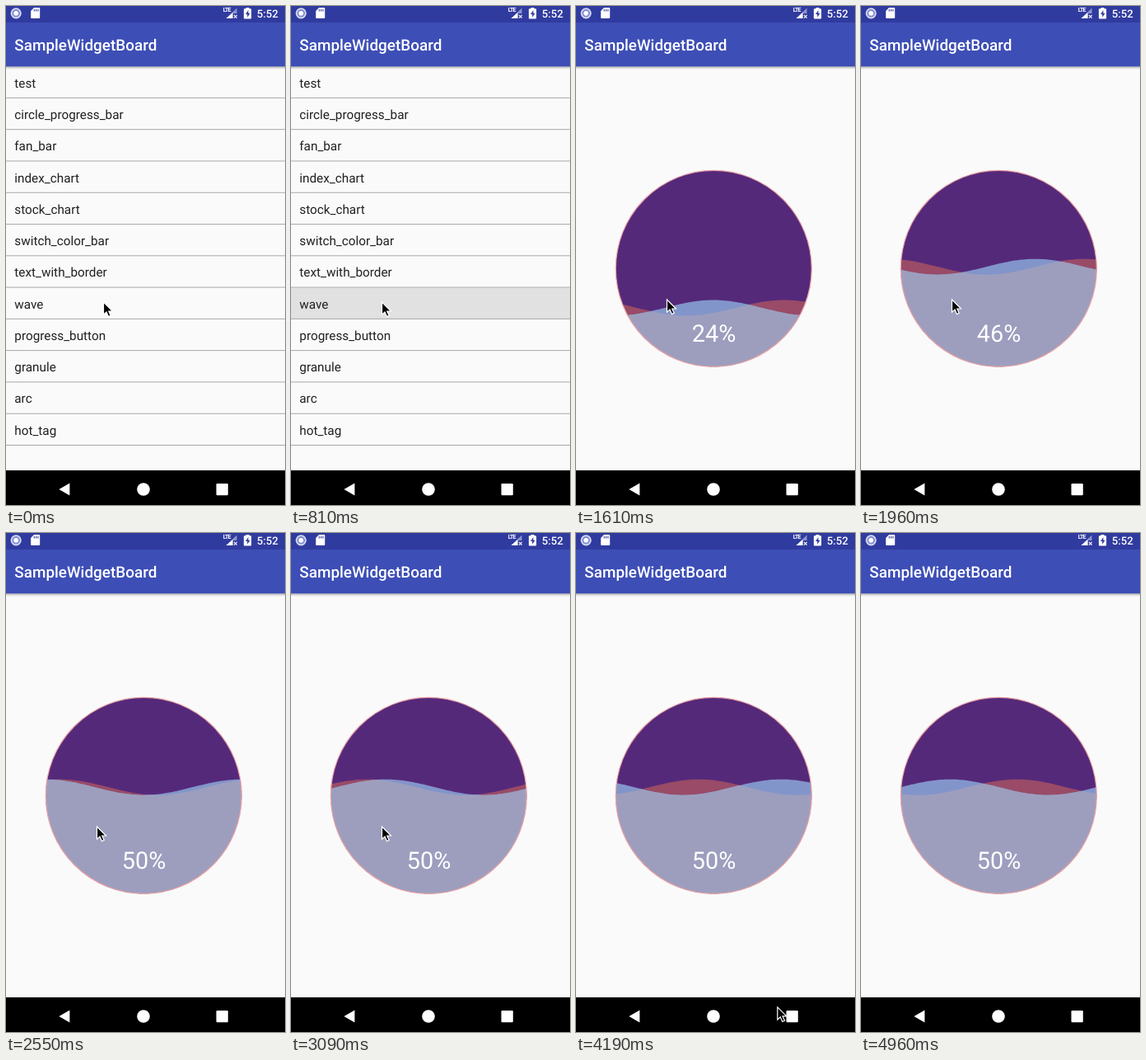
Animation, 339 px wide and 605 px high, one loop 5030 ms. Source, as an HTML page:

```html
<!DOCTYPE html>
<html lang="en">
<head>
<meta charset="utf-8">
<title>Wave progress</title>
<style>
  html, body { margin: 0; width: 100%; height: 100%; overflow: hidden; background: #000; }
  svg { display: block; width: 339px; height: 605px; font-family: Roboto, sans-serif; text-rendering: geometricPrecision; }
</style>
</head>
<body>
<svg viewBox="0 0 339 605">
  <defs>
    <linearGradient id="shade" x2="0" y2="1">
      <stop offset="0" stop-color="#000" stop-opacity=".3"/>
      <stop offset="1" stop-color="#000" stop-opacity="0"/>
    </linearGradient>
    <clipPath id="disc"><circle cx="167.3" cy="318.4" r="119"/></clipPath>
    <g id="chrome">
      <rect width="339" height="563" fill="#fafafa"/>
      <rect y="73" width="339" height="4" fill="url(#shade)"/>
      <rect width="339" height="73.3" fill="#3d4eb6"/>
      <rect width="339" height="20" fill="#303b9f"/>
      <text x="10.3" y="54" font-size="18.9" font-weight="500" fill="#fff">SampleWidgetBoard</text>
    </g>
  </defs>

  <rect width="339" height="605"/>
  <use href="#chrome"/>
  <rect id="press" y="341.5" width="339" height="37.5" opacity=".1"/>
  <g id="list" font-size="15.3" fill="#212121"></g>

  <g id="page">
    <use href="#chrome"/>
    <g clip-path="url(#disc)">
      <rect x="47" y="198" width="241" height="241" fill="#55297a"/>
      <path id="red" fill="#994b67"/>
      <path id="blue" fill="#8295ca"/>
      <path id="both" fill="#9d9ebe"/>
    </g>
    <circle cx="167.3" cy="318.4" r="119" fill="none" stroke="#eba3a6" stroke-width="1.2"/>
    <text id="percent" x="167.5" y="406.5" font-size="28.8" text-anchor="middle" fill="#fff"></text>
  </g>

  <!-- status bar -->
  <g fill="#fff">
    <circle cx="12.2" cy="8.8" r="5.7" fill="#7f8bd0" stroke="#d5d9f0" stroke-width="1.8"/>
    <circle cx="12.2" cy="8.8" r="2.9"/>
    <path d="M34 2h6.2q1 0 1 1v11q0 1-1 1h-9q-1 0-1-1V6z"/>
    <path d="M34.3 4v2.6M36.6 4v2.6M38.9 4v2.6" stroke="#303b9f" stroke-width="1.1"/>
    <text x="263.8" y="7.4" font-size="7.2" font-weight="700" letter-spacing="-.9">LTE</text>
    <path d="M280.5 2.5V9h-5v6h-8z" fill="#8d94cb"/>
    <path d="M275.5 8v7h-8z"/>
    <path d="M277 11l3.6 3.6M280.6 11l-3.6 3.6" stroke="#fff" stroke-width="1.1"/>
    <path d="M291.5 3.3V2h4v1.3h1.8q.8 0 .8.8v10.6q0 .8-.8.8h-7.6q-.8 0-.8-.8V4.1q0-.8.8-.8z"/>
    <path d="M294.4 5l-3.4 5h2.2v3.8l3.4-5h-2.2z" fill="#303b9f"/>
    <text x="304.8" y="13.8" font-size="13.2" font-weight="500">5:52</text>
  </g>

  <!-- navigation bar -->
  <g fill="#fff">
    <path d="M64.4 586l13-7.4v14.8z"/>
    <circle cx="167" cy="586" r="7.8"/>
    <rect x="255.5" y="579" width="14.3" height="14.3" rx="1.2"/>
  </g>

  <path id="cursor" d="M0 0V15.2L3.5 12 6 17.6 8.7 16.4 6.3 11H11z" stroke="#fff" stroke-width="1.2"/>
</svg>

<script>
const LOOP = 5030, REFRESH = 60;
const SPAN = 238, SWELL = 9.5;   // wavelength and half height of a wave
const $ = id => document.getElementById(id);

const rows = ['test', 'circle_progress_bar', 'fan_bar', 'index_chart', 'stock_chart',
  'switch_color_bar', 'text_with_border', 'wave', 'progress_button', 'granule', 'arc', 'hot_tag'];
$('list').innerHTML = rows.map((label, i) =>
  `<text x="10.3" y="${98.8 + 38.25 * i}">${label}</text>
   <rect y="${110.9 + 38.28 * i}" width="339" height="1" fill="#a9a9a9"/>`).join('');

const ramp = (t, from, to) => Math.min(1, Math.max(0, (t - from) / (to - from)));
const easeOut = k => 1 - (1 - k) ** 2;
const easeInOut = k => (1 - Math.cos(Math.PI * k)) / 2;

const fillAt = clock => 50 * easeInOut(ramp(clock, 1025, 2135));
const wave = (middle, crest) => x => middle - SWELL * Math.cos(2 * Math.PI * (x - crest) / SPAN);

function area(height) {
  let d = 'M46 440';
  for (let x = 46; x <= 289; x += 3) d += `L${x} ${height(x).toFixed(2)}`;
  return d + 'V440z';
}

function drawCursor(t) {
  const nudge = easeOut(ramp(t, 60, 220));
  const leave = easeOut(ramp(t, 3780, 4200));
  const x = 118.5 - 8 * nudge + 135 * leave;
  const y = 359 - 3 * ramp(t, 810, 900) + 220 * leave + 34 * ramp(t, 4190, 4350);
  $('cursor').setAttribute('transform', `translate(${x} ${y})`);
}

function drawPage(t) {
  const open = ramp(t, 840, 990);
  $('press').style.display = t >= 810 ? '' : 'none';
  $('page').setAttribute('opacity', Math.min(1, 2.5 * open));
  $('page').setAttribute('transform', `translate(0 ${33 * (1 - easeOut(open))})`);
}

function drawWaves(t) {
  // The waves run slower while the page is opening
  const clock = t - .235 * Math.min(0, t - 1590);
  const middle = 436.7 - SPAN / 100 * fillAt(clock) - SWELL;
  const red = wave(middle, 15 + .052 * (clock - 1590));
  const blue = wave(middle, 167 + .1241 * (clock - 1590));
  $('red').setAttribute('d', area(red));
  $('blue').setAttribute('d', area(blue));
  $('both').setAttribute('d', area(x => Math.max(red(x), blue(x))));
  $('percent').textContent = Math.round(fillAt(clock - 28)) + '%';
}

const start = performance.now();
function tick() {
  const t = (performance.now() - start) % LOOP;
  const held = Math.floor((t - 15) / REFRESH) * REFRESH + REFRESH / 2;
  drawCursor(held);
  drawPage(held);
  drawWaves(held);
  requestAnimationFrame(tick);
}
tick();
</script>
</body>
</html>
```
